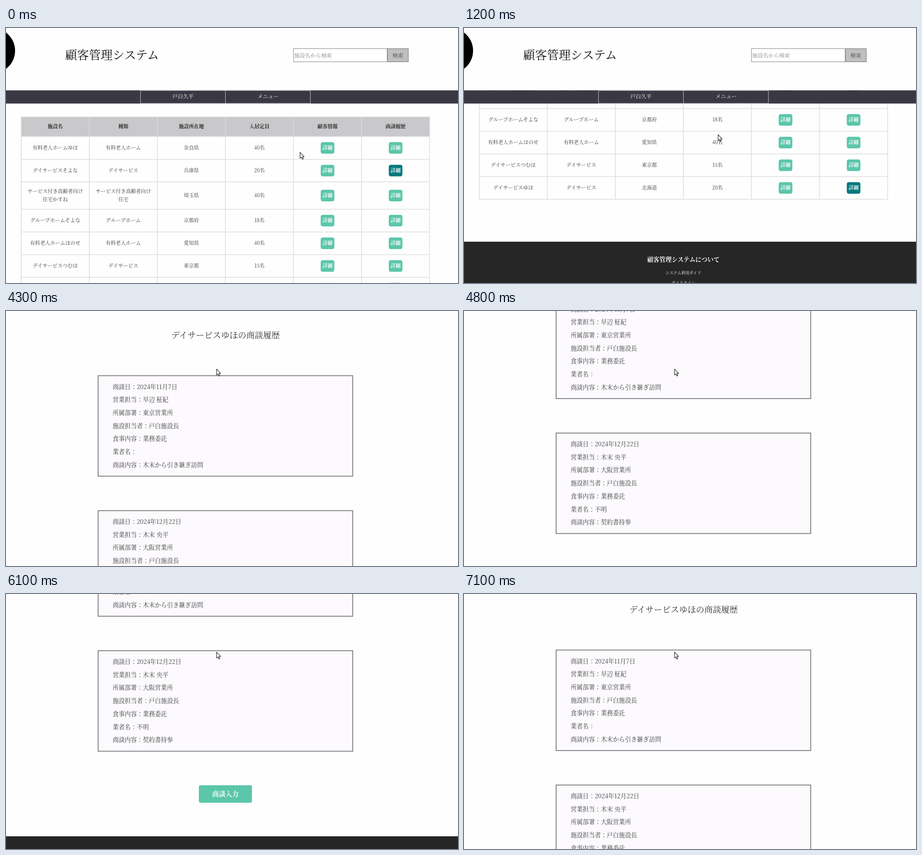
Recreate the animation shown at these times as an HTML page. Size 996 by 562 pixels, loop 7200 ms.

```html
<!DOCTYPE html>
<html lang="ja">
<head>
<meta charset="utf-8">
<title>顧客管理システム</title>
<style>
  html, body { margin: 0; width: 100%; height: 100%; overflow: hidden; background: #fefefe; }
  svg { display: block; width: 100%; height: 100%; }
  text { font-family: "Noto Serif CJK JP", "Noto Serif JP", "Noto Serif", "Noto Sans CJK JP", "Noto Sans CJK", serif; white-space: pre; }
</style>
</head>
<body>
<svg id="stage" viewBox="0 0 996 562"></svg>
<script>
const LOOP = 7200, STEP = 100;
const GREEN = '#5bc6aa', TEAL = '#047a7d', DARK = '#262626', LINE = '#dcdcdd';

const rect = (x, y, w, h, fill, extra = '') =>
  `<rect x="${x}" y="${y}" width="${w}" height="${h}" fill="${fill}" ${extra}/>`;

// y is the vertical middle of the line
const text = (str, x, y, size, fill = '#3a3a3a', weight = 400, anchor = 'middle') =>
  `<text x="${x}" y="${(y + size * 0.38).toFixed(2)}" font-size="${size}" fill="${fill}"
    font-weight="${weight}" text-anchor="${anchor}">${str}</text>`;

const path = (d, fill, stroke = 'none', width = 1) =>
  `<path d="${d}" fill="${fill}" stroke="${stroke}" stroke-width="${width}" stroke-linejoin="round"/>`;

const columnX = i => 33.5 + i * 150;

function table() {
  const heads = ['施設名', '種類', '施設所在地', '入居定員', '顧客情報', '商談履歴'];
  const rows = [
    ['有料老人ホームゆほ', '有料老人ホーム', '奈良県', '40名'],
    ['デイサービスそよな', 'デイサービス', '兵庫県', '20名'],
    ['サービス付き高齢者向け|住宅かすね', 'サービス付き高齢者向け|住宅', '埼玉県', '40名'],
    ['グループホームそよな', 'グループホーム', '京都府', '18名'],
    ['有料老人ホームほのせ', '有料老人ホーム', '愛知県', '40名'],
    ['デイサービスつむは', 'デイサービス', '東京都', '15名'],
    ['デイサービスゆほ', 'デイサービス', '北海道', '20名']
  ];
  const visited = [1, 6];
  const edges = [196, 239, 289.5, 339, 399.5, 449.5, 499.5, 549.5, 599.5];
  const center = i => columnX(i) + 75;
  let out = rect(33.5, 196, 900, 43, '#c9c9cb');
  heads.forEach((head, i) => out += text(head, center(i), 217, 11.1, '#222', 600));
  rows.forEach((cells, r) => {
    const mid = (edges[r + 1] + edges[r + 2]) / 2 - 0.3;
    cells.forEach((cell, i) => {
      const lines = cell.split('|');
      lines.forEach((line, n) =>
        out += text(line, center(i), mid + (n - (lines.length - 1) / 2) * 18, 11.1));
    });
    for (const i of [4, 5]) {
      const color = i === 5 && visited.includes(r) ? TEAL : GREEN;
      out += rect(center(i) - 15, mid - 12.5, 30, 25.5, color, 'rx="4.2"')
           + text('詳細', center(i), mid, 11.1, '#fff', 700);
    }
  });
  const grid = edges.map(y => `M33 ${y}H934`).join('')
    + heads.concat('').map((_, i) => `M${columnX(i)} 196V599.5`).join('');
  return out + path(grid, 'none', LINE, 1.5);
}

function listHeader() {
  return rect(0, 0, 996, 137.4, '#fefefe')
    + '<circle cx="-30" cy="50" r="50" fill="#000"/>'
    + text('顧客管理システム', 130.3, 59.5, 26.2, '#111', 500, 'start')
    + rect(633.5, 45.5, 206.5, 29, '#fff', 'stroke="#808080"')
    + text('施設名から検索', 635, 60, 11.9, '#858585', 400, 'start')
    + rect(840.5, 45.5, 46, 29, '#bfbfbf', 'stroke="#707070"')
    + text('検索', 863.5, 60, 11.9, '#444')
    + rect(0, 137.4, 996, 29.1, '#3a3943')
    + path('M296.3 137.8H670.7V166.1H296.3ZM483.5 137.8V166.1', 'none', '#d8d8da', 0.9)
    + text('戸白久平', 390, 150.5, 11.8, '#fff')
    + text('メニュー', 577.5, 150.5, 11.8, '#fff');
}

function listFooter() {
  return rect(0, 693, 996, 400, DARK)
    + text('顧客管理システムについて', 483.5, 731.5, 13.45, '#fff', 600)
    + text('システム利用ガイド', 483.5, 761.5, 8.9, '#fff')
    + text('ガイドライン', 483.5, 783.5, 8.9, '#fff');
}

function card(top, values) {
  const labels = ['商談日', '営業担当', '所属部署', '施設担当者', '食事内容', '業者名', '商談内容'];
  return rect(203, top + 1, 561, 221.5, '#fcfafd', 'stroke="#858587" stroke-width="2"')
    + labels.map((label, i) =>
        text(`${label}：${values[i]}`, 235, top + 25 + i * 28.7, 13.3, '#3a3a3a', 400, 'start')).join('');
}

function history() {
  return text('デイサービスゆほの商談履歴', 484, 81.5, 18.5, '#333')
    + card(170.5, ['2024年11月7日', '早辺 柾紀', '東京営業所', '戸白施設長', '業務委託', '', '木末から引き継ぎ訪問'])
    + card(468, ['2024年12月22日', '木末 央平', '大阪営業所', '戸白施設長', '業務委託', '不明', '契約書持参'])
    + rect(425, 765.5, 117, 38.5, GREEN, 'rx="4"')
    + text('商談入力', 483.5, 784.5, 14.6, '#fff', 700)
    + rect(0, 878, 996, 400, DARK);
}

const arrow = path('M0 0V13.2L3 10.6L5 15.2L7.2 14.2L5.2 9.8H9Z', '#fff', '#111', 1.1);
const hand = path('M3 1.2Q4.2-.6 5.2 1.2V6L10 7Q11.8 7.6 11.5 9.5L10.5 14V17H4V14.5L.3 10.2Q-.3 8.6 1.3 8.8L3 10Z',
  '#fff', '#111', 1);

const stage = document.getElementById('stage');
stage.innerHTML = `
  <g id="list"><g id="listScroll">${table()}${listFooter()}</g>${listHeader()}</g>
  <g id="history">${history()}</g>
  <g id="arrow">${arrow}</g>
  <g id="hand">${hand}</g>`;
const part = id => document.getElementById(id);
const show = (id, on) => part(id).setAttribute('display', on ? 'inline' : 'none');
const move = (id, x, y) => part(id).setAttribute('transform', `translate(${x} ${y})`);

// keys: [time, ...values], linear in between
function track(keys, t) {
  const next = keys.findIndex(key => key[0] > t);
  if (next === 0) return keys[0].slice(1);
  if (next < 0) return keys[keys.length - 1].slice(1);
  const a = keys[next - 1], b = keys[next], k = (t - a[0]) / (b[0] - a[0]);
  return a.slice(1).map((v, i) => v + (b[i + 1] - v) * k);
}

const listKeys = [[0, 0], [200, 20], [700, 180], [1000, 222]];
const historyKeys = [[4100, 0], [4300, 29], [4800, 200], [5100, 300], [5400, 344],
  [6100, 344], [6300, 290], [6600, 90], [6800, 48]];
const pointerKeys = [[0, 648, 274], [800, 648, 274], [1200, 560, 235], [1500, 560, 235],
  [1800, 680, 280], [2100, 825, 338], [2300, 861, 350], [3500, 861, 350],
  [3700, 660, 235], [3900, 464, 128]];

function render(now) {
  const t = Math.floor((now % LOOP) / STEP) * STEP;
  const onList = t < 3200, overLink = t >= 2300 && onList;
  show('list', onList);
  show('history', !onList);
  show('hand', overLink);
  show('arrow', !overLink);
  move('listScroll', 0, -track(listKeys, t)[0]);
  move('history', 0, -track(historyKeys, t)[0]);
  const pointer = track(pointerKeys, t);
  move('arrow', ...pointer);
  move('hand', ...pointer);
}

const start = performance.now();
function tick() {
  render(performance.now() - start);
  requestAnimationFrame(tick);
}
tick();
</script>
</body>
</html>
```
